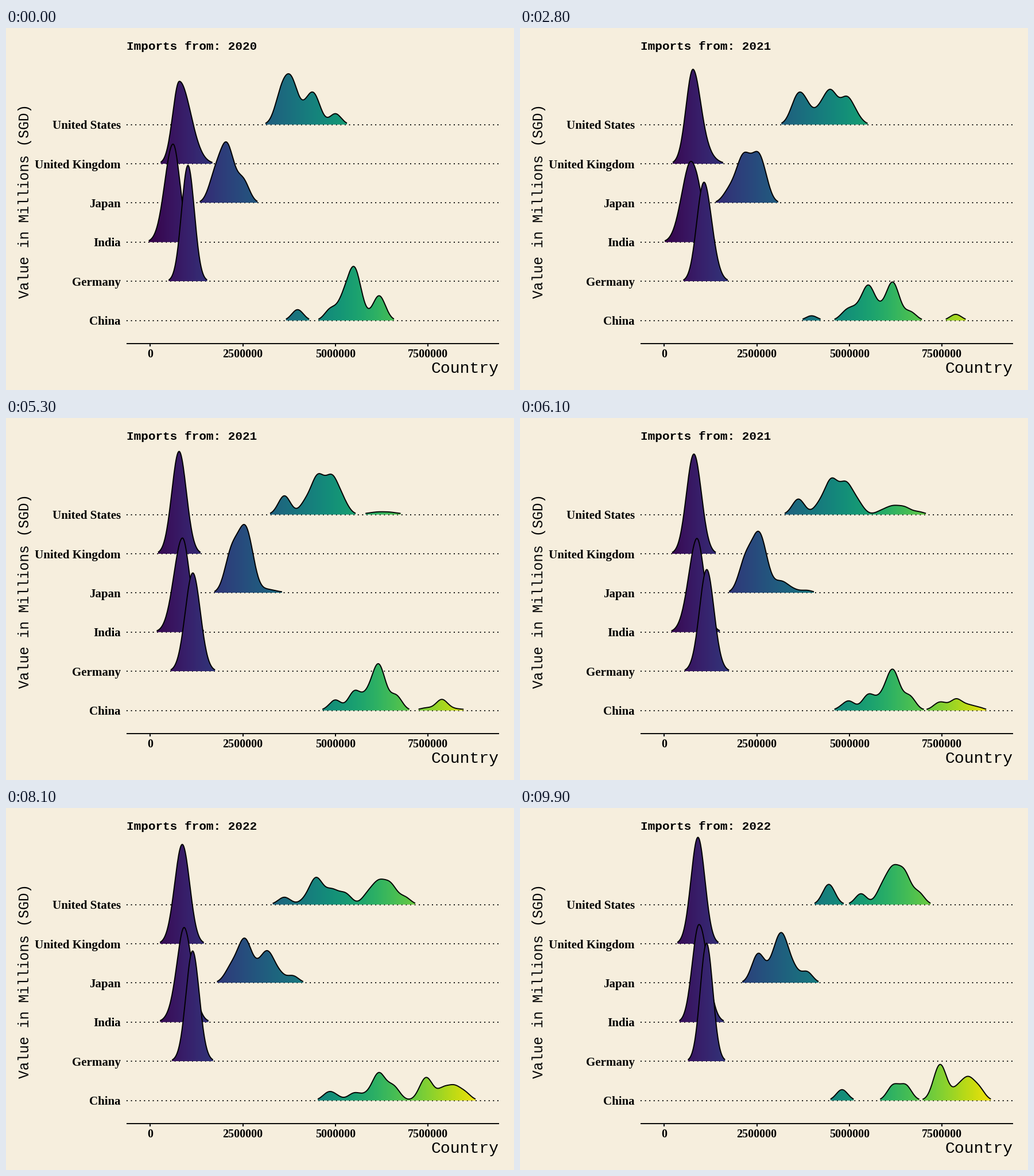
Animation of 885x632 px, one loop 10000 ms. Source, as a matplotlib script:

```python
import numpy as np
import matplotlib.pyplot as plt
from matplotlib.animation import FuncAnimation
from matplotlib.colors import ListedColormap
from matplotlib.path import Path

W, H, DPI = 885, 632, 100
FRAMES, INTERVAL = 100, 100
BG, INK = "#F6EEDD", "black"
MONO, SERIF = "Liberation Mono", "Liberation Serif"
LEFT, RIGHT = 210, 859            # panel edges
X0, X1 = 239.5, 829.5             # range of the density grid
TOP_ROW, ROW_GAP = 168.6, 68.4
MONTHS, UNIT, BANDWIDTH = 12, 18.9, 10   # one month: a bell of this size
CUT = 2.05                        # tails lower than this are hidden
LINE = 1.9
PT = 72 / DPI                     # pixels to points

grid = np.linspace(X0, X1, 512)
cmap = ListedColormap(plt.get_cmap("viridis")(np.linspace(0, 1, 512)) ** 1.2)


def bell(c, months, left, right=None):
    """A hump with its own spread on each side; its area is the month count."""
    right = right or left
    spread = np.where(grid < c, left, right)
    height = months * UNIT * BANDWIDTH * 2 / (left + right)
    return height * np.exp(-((grid - c) / spread) ** 2 / 2)


def peak(c, left, right=None):
    """A whole year gathered in one hump."""
    return bell(c, MONTHS, left, right)


def humps(*parts):
    """Clusters (position, months), or a position for a lone month.

    The more months a cluster holds, the wider it gets."""
    pairs = [p if isinstance(p, tuple) else (p, 1) for p in parts]
    return sum(bell(c, n, BANDWIDTH * n ** 0.1) for c, n in pairs)


# Densities for 2020, 2021 and 2022
countries = {
    "United States": (
        humps((480, 3), (498, 4.2), 523, (537, 2.8), 574),
        humps((485, 2), 521, (543, 4), (568, 4), 587),
        humps((538, 2), 594, (630, 1.3), (649, 3.3), (670, 3), 695)),
    "United Kingdom": (
        peak(302, 11.5, 20), peak(301, 12.5), peak(310, 12.2)),
    "Japan": (
        humps((364, 2.5), (385, 6.2), (413, 2.2)),
        humps((393, 4.5), (416, 6.7), 428),
        humps((415, 3), 440, (456, 5), 477, 500)),
    "India": (
        peak(291, 14.5, 12), peak(307, 15.2, 12.3), peak(312, 11.9, 14.7)),
    "Germany": (
        peak(317, 11.2), peak(325.5, 13.4), peak(325, 11)),
    "China": (
        humps(508, 565, (587, 1.6), (607, 5.6), (650, 2.5)),
        humps(574, (607, 2), 628, (649, 5.2), (680, 1.4), 759),
        humps(561, (650, 1.4), (672, 1.4), (732, 3.8), 763, (781, 2), 800)),
}

fig = plt.figure(figsize=(W / DPI, H / DPI), dpi=DPI, facecolor=BG)
ax = fig.add_axes([0, 0, 1, 1])
ax.axis("off")


def text(x, y, s, size, font, **kw):
    kw = {"va": "baseline", "color": INK, **kw}
    return ax.text(x, y, s, fontsize=size * PT, family=font, **kw)


def line(xs, ys, **kw):
    kw = {"color": INK, "lw": LINE * PT, "solid_capstyle": "butt",
          "dash_capstyle": "butt", **kw}
    return ax.plot(xs, ys, **kw)[0]


class Ridge:
    def __init__(self, row, years, z):
        self.row, self.years = row, years
        self.fill = ax.imshow(np.arange(512)[None, :], cmap=cmap,
                              extent=(X0, X1, row, row - 210), aspect="auto",
                              interpolation="nearest", zorder=z)
        self.edge = line([], [], zorder=z + 0.5, solid_joinstyle="round")

    def update(self, t):
        i = min(int(t), 1)
        a, b = self.years[i:i + 2]
        h = a + (b - a) * (t - i)
        shown = np.flatnonzero(h >= CUT)
        runs = np.split(shown, np.flatnonzero(np.diff(shown) > 1) + 1)
        pieces = []
        for run in runs:
            x, y = grid[run], self.row - h[run]
            xs = np.r_[x[0], x, x[-1], x[0]]
            ys = np.r_[self.row, y, self.row, self.row]
            pieces.append(Path(np.c_[xs, ys], closed=True))
        self.fill.set_clip_path(Path.make_compound_path(*pieces), ax.transData)
        self.edge.set_data(grid, np.where(h >= CUT, self.row - h, np.nan))


ridges = []
for k, (name, years) in enumerate(countries.items()):
    row = TOP_ROW + k * ROW_GAP
    line([LEFT, RIGHT], [row, row], linestyle=(0, (1, 3)), zorder=1)
    text(200, row + 7.5, name, 21.07, SERIF, weight="bold", ha="right")
    ridges.append(Ridge(row, years, 2 + k))

line([LEFT, RIGHT], [551.4, 551.4])
for k in range(4):
    x = 251.2 + 161.3 * k
    line([x, x], [551.4, 556.4])
    text(x, 575, str(2500000 * k), 20, SERIF, weight="bold", ha="center")

text(RIGHT, 602, "Country", 28.09, MONO, ha="right")
text(40, 302, "Value in Millions (SGD)", 24.58, MONO, rotation=90,
     rotation_mode="anchor", ha="center")
title = text(LEFT, 38, "", 21.07, MONO, weight="bold")

ax.set_xlim(0, W)
ax.set_ylim(H, 0)


def update(frame):
    t = 2 * frame / (FRAMES - 1)
    title.set_text(f"Imports from: {2020 + round(t)}")
    for ridge in ridges:
        ridge.update(t)
    return []


anim = FuncAnimation(fig, update, frames=FRAMES, interval=INTERVAL,
                     repeat=True, repeat_delay=0, blit=False)
plt.show()
```
